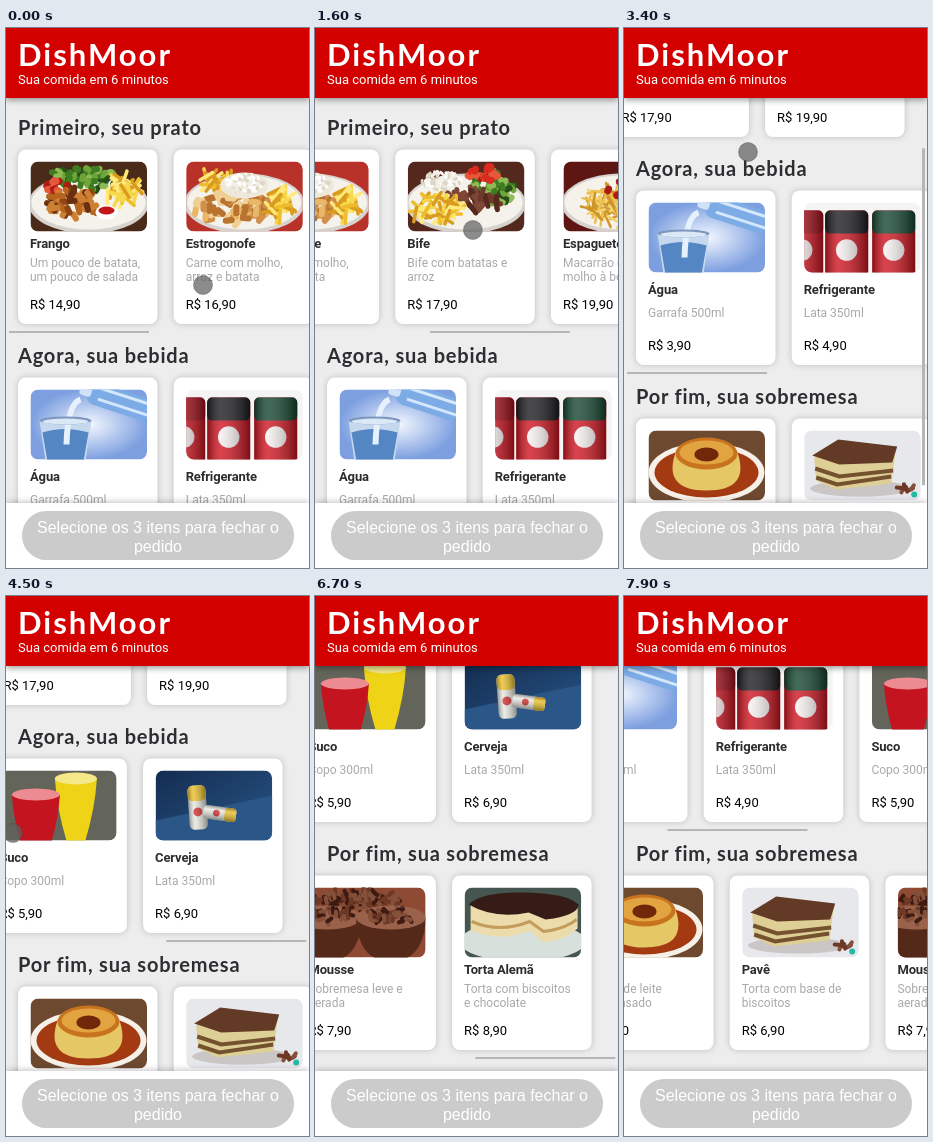
These frames come from a looping animation (303x540 px, 8 s). An HTML page:

```html
<!DOCTYPE html>
<html lang="pt">
<head>
<meta charset="utf-8">
<title>Cardápio</title>
<style>
  html, body { margin: 0; width: 100%; height: 100%; overflow: hidden; background: #ededed; }
  svg { display: block; width: 100vw; height: 100vh; }
  text { font-family: Roboto, sans-serif; font-size: 13px; }
  .brand { font: 700 31px Lato, sans-serif; letter-spacing: 2px; fill: #fff; }
  .title { font: 700 20px Lato, sans-serif; letter-spacing: .8px; fill: #302d32; }
  .name { font-weight: 700; letter-spacing: -.15px; fill: #2c2c2c; }
  .note { font-size: 12px; fill: #a9a9a9; }
  .order { font: 16px "Liberation Sans", Arial, sans-serif; fill: #fff; text-anchor: middle; }
  .card { fill: #fff; filter: drop-shadow(0 0 3px rgba(0, 0, 0, .2)); }
  .bar { fill: #b6b6b6; }
  .header { fill: #d30000; filter: drop-shadow(0 2px 3px rgba(0, 0, 0, .4)); }
  .footer { fill: #fff; filter: drop-shadow(0 -1px 3px rgba(0, 0, 0, .25)); }
</style>
</head>
<body>
<svg viewBox="0 0 303 540">
  <defs>
    <clipPath id="frame"><rect width="116.5" height="70" rx="8"/></clipPath>
    <radialGradient id="aqua"><stop stop-color="#f4f8ff"/><stop offset="1" stop-color="#7d9fe0"/></radialGradient>
    <linearGradient id="night" x2="1" y2="1"><stop stop-color="#142c50"/><stop offset="1" stop-color="#285789"/></linearGradient>
    <linearGradient id="metal"><stop stop-opacity=".35"/><stop offset=".3" stop-color="#fff" stop-opacity=".2"/><stop offset="1" stop-opacity=".4"/></linearGradient>
  </defs>
  <g id="page"></g>
  <rect class="header" width="303" height="70"/>
  <text class="brand" x="12" y="37.5">DishMoor</text>
  <text x="12" y="56" fill="#fff">Sua comida em 6 minutos</text>
  <rect class="footer" y="475" width="303" height="65"/>
  <rect x="16" y="483" width="272" height="49" rx="24.5" fill="#cbcbcb"/>
  <text class="order" x="152" y="505">Selecione os 3 itens para fechar o</text>
  <text class="order" x="152" y="524">pedido</text>
  <rect id="pageBar" class="bar" x="298" width="3" height="337"/>
  <circle id="touch" r="9.5" fill="#5f5f5f" fill-opacity=".72" stroke="#444" stroke-opacity=".35"/>
</svg>
<script>
const DURATION = 8000, STEP = 100;
const ROW_TOP = 121, ROW_PITCH = 228, CARD_PITCH = 155.7, MAX_SCROLL = 342;

// Pictures are 116.5 x 70
let seed = 7;
const random = () => (seed = seed * 16807 % 2147483647) / 2147483647;
const oval = (x, y, rx, ry, fill) => `<ellipse cx="${x}" cy="${y}" rx="${rx}" ry="${ry}" fill="${fill}"/>`;
const box = (x, y, w, h, fill, r = 0) => `<rect x="${x}" y="${y}" width="${w}" height="${h}" rx="${r}" fill="${fill}"/>`;
const shape = (d, fill) => `<path d="${d}" fill="${fill}"/>`;
const line = (d, color, width) => `<path d="${d}" fill="none" stroke="${color}" stroke-width="${width}"/>`;
const placed = (x, y, angle, art) => `<g transform="translate(${x} ${y}) rotate(${angle})">${art}</g>`;
const back = fill => box(0, 0, 117, 70, fill);

const foods = {
  fries: { w: 18, h: 3.5, colors: ['#f7d84a', '#eebd2c', '#ffe97a', '#d99c20'] },
  greens: { w: 9, h: 6, colors: ['#3f7d22', '#6ea43a', '#274f18', '#8fbb55'] },
  meat: { w: 11, h: 6, colors: ['#8d4513', '#b5651d', '#6b2f10', '#cd7f32'] },
  steak: { w: 16, h: 5, colors: ['#6e3a2a', '#7d4635', '#55291d'] },
  stew: { w: 12, h: 6, colors: ['#b8742f', '#e9b767', '#d0904a', '#f0cf94'] },
  rice: { w: 5, h: 3, colors: ['#fff', '#f3efe4', '#ddd6c6'] },
  tomato: { w: 9, h: 7, colors: ['#d92b1e', '#ad1c12', '#e8573c'] },
  pasta: { w: 20, h: 2.5, colors: ['#f5d36c', '#cf9428', '#ecc04f'] },
  cocoa: { w: 9, h: 4, colors: ['#6d3825', '#3d1a12', '#845039'] }
};

function pile(food, x, y, rx, ry) {
  const { w, h, colors } = foods[food];
  return Array.from({ length: Math.ceil(8 * rx * ry / w / h) }, () => {
    const angle = random() * 2 * Math.PI, r = Math.sqrt(random());
    const color = colors[Math.floor(random() * colors.length)];
    return placed(x + rx * r * Math.cos(angle), y + ry * r * Math.sin(angle), random() * 180,
      box(-w / 2, -h / 2, w, h, color, h / 2));
  }).join('');
}

const dish = table => back(table) + oval(58, 42, 60, 30, '#d6d3cf') + oval(58, 41, 57, 27, '#f5f2ec');
const can = (x, y, w, h, color, top, mark) => box(x, y, w, h, color, 5) + box(x, y, w, h * .35, top, 5) +
  oval(x + w / 2, y + h * .6, w / 4, w / 4, mark) + box(x, y, w, h, 'url(#metal)', 5);
const soda = (x, top) => can(x, 8, 43, 66, '#cf1420', top, '#f5efef');
const beer = scale => `<g transform="scale(${scale})">${can(-9, -22, 18, 44, '#e5e6df', '#e9bd2b', '#cf2a2a')}</g>`;
const glass = (x, y, w, color, foam) =>
  shape(`M${x - w} ${y}q2 34 ${w * .7} 72h${w * .6}q${w * .7 - 2}-38 ${w * .7}-72z`, color) + oval(x, y, w, 6, foam);
const cup = x => shape(`M${x - 35} 30q2 44 35 44t35-44z`, '#54291a') + oval(x, 30, 35, 12, '#9a624a') + pile('cocoa', x, 28, 25, 7);

const photos = {
  chicken: () => dish('#4a2a18') + pile('greens', 52, 18, 38, 11) + pile('tomato', 26, 26, 12, 7) +
    pile('fries', 92, 32, 17, 16) + pile('meat', 44, 42, 27, 14) + oval(76, 51, 11, 7, '#fff') + oval(76, 49, 8, 4, '#c31616'),
  stroganoff: () => dish('#b8322a') + pile('stew', 48, 46, 40, 16) + pile('fries', 94, 42, 12, 16) + pile('fries', 30, 18, 16, 8) +
    oval(58, 24, 24, 13, '#eee8da') + pile('rice', 58, 22, 19, 9),
  steak: () => dish('#54281c') + pile('rice', 34, 20, 20, 10) + pile('greens', 88, 26, 22, 17) + pile('tomato', 76, 13, 15, 8) +
    pile('steak', 66, 38, 26, 10) + pile('fries', 28, 47, 24, 13),
  spaghetti: () => dish('#5e1612') + pile('pasta', 60, 42, 36, 18) + pile('tomato', 64, 27, 22, 8),
  water: () => back('url(#aqua)') +
    placed(88, 11, 18, box(-32, -11, 66, 23, '#7dabe6', 9) + box(-40, -6, 12, 12, '#cfe2f7', 3) + line('M-20-6H34M-20 5H34', '#d5e7fb', 3)) +
    shape('M9 31H61L55 72H15z', '#c6d8ee') + shape('M12 43q22-7 46 0L53 72H17z', '#5486c4') +
    line('M50 10Q37 14 36 55', '#e6f1fd', 6) + oval(35, 31, 26, 4, '#7d97bd') + oval(35, 32, 23, 3, '#dbe8f6'),
  soda: () => back('#f4f4f4') + soda(-24, '#a7101c') + soda(21, '#1c1c20') + soda(68, '#14452f'),
  juice: () => back('#64655a') + glass(76, 8, 21, '#eed316', '#f5e889') + glass(36, 24, 24, '#c41420', '#ec8b91'),
  beer: () => back('url(#night)') + shape('M0 50L117 25V70H0z', '#2a5688') + placed(42, 37, -4, beer(1)) + placed(64, 43, 98, beer(.75)),
  flan: () => back('#6d4930') + oval(58, 42, 58, 30, '#f5f0e8') + oval(58, 42, 52, 25, '#a33a12') +
    shape('M27 22Q14 60 58 60T89 22z', '#e5c766') + oval(58, 23, 31, 16, '#c8741f') + oval(58, 22, 27, 12, '#e2a440') + oval(58, 24, 12, 7, '#71270a'),
  trifle: () => back('#e7e8eb') + oval(56, 58, 50, 8, '#c9c6c5') + shape('M10 27L35 10 92 17 87 53 31 59 12 50z', '#ddcf95') +
    line('M11 38l24 8 54-6M12 47l21 7 54-8', '#74512f', 4) + shape('M8 25L34 9 93 16 88 32 35 34z', '#633a25') +
    pile('cocoa', 100, 58, 9, 3) + oval(110, 64, 3, 3, '#25b9a4'),
  mousse: () => back('#8f4a34') + pile('cocoa', 48, 12, 45, 10) + cup(18) + cup(82),
  tart: () => back('#45554f') + oval(58, 54, 63, 20, '#d8e0dc') + shape('M6 17V43Q35 55 65 43L79 55Q101 52 113 41V17z', '#ecdbab') +
    line('M7 34q28 12 58 0l14 10q20-2 33-12', '#c49d5c', 3) + shape('M4 17Q17 4 60 5T114 17Q114 28 81 32L64 25Q30 32 4 17z', '#351c17')
};

const menu = [
  { title: 'Primeiro, seu prato', items: [
    ['chicken', 'Frango', '14,90', 'Um pouco de batata,', 'um pouco de salada'],
    ['stroganoff', 'Estrogonofe', '16,90', 'Carne com molho,', 'arroz e batata'],
    ['steak', 'Bife', '17,90', 'Bife com batatas e', 'arroz'],
    ['spaghetti', 'Espaguete', '19,90', 'Macarrão com', 'molho à bolonhesa']] },
  { title: 'Agora, sua bebida', items: [
    ['water', 'Água', '3,90', 'Garrafa 500ml'],
    ['soda', 'Refrigerante', '4,90', 'Lata 350ml'],
    ['juice', 'Suco', '5,90', 'Copo 300ml'],
    ['beer', 'Cerveja', '6,90', 'Lata 350ml']] },
  { title: 'Por fim, sua sobremesa', items: [
    ['flan', 'Pudim', '5,90', 'Pudim de leite', 'condensado'],
    ['trifle', 'Pavê', '6,90', 'Torta com base de', 'biscoitos'],
    ['mousse', 'Mousse', '7,90', 'Sobremesa leve e', 'aerada'],
    ['tart', 'Torta Alemã', '8,90', 'Torta com biscoitos', 'e chocolate']] }
];

const label = (kind, y, words) => `<text class="${kind}" x="12" y="${y}">${words}</text>`;

function card([photo, name, price, ...notes], index) {
  const spare = notes.length > 1 ? 0 : 4.5;
  return placed(12 + index * CARD_PITCH, 0, 0, `
    <rect class="card" y=".5" width="139.5" height="174.5" rx="8"/>
    ${placed(12.5, 12.5, 0, `<g clip-path="url(#frame)">${photos[photo]()}</g>`)}
    ${label('name', 99 + spare, name)}
    ${notes.map((note, i) => label('note', 118 + 2 * spare + i * 14, note)).join('')}
    ${label('price', 160, 'R$ ' + price)}`);
}

const byId = id => document.getElementById(id);
byId('page').innerHTML = menu.map(({ title, items }, i) => placed(0, ROW_TOP + i * ROW_PITCH, 0, `
  ${label('title', -14, title)}
  <g id="row${i}">${items.map(card).join('')}</g>
  <rect id="row${i}Bar" class="bar" y="182" width="140" height="2"/>`)).join('');

// Each swipe drags one target by a distance; the finger glides from one to the next
const swipes = [
  { target: 'row0', start: 400, end: 900, x: 207, y: 243, by: 172 },
  { target: 'row0', start: 1450, end: 1800, x: 229, y: 202, by: 166 },
  { target: 'page', start: 2900, end: 3400, x: 124, y: 311, by: 187 },
  { target: 'row1', start: 3500, end: 3800, x: 200, y: 237, by: 150 },
  { target: 'row1', start: 4200, end: 4500, x: 199, y: 237, by: 192 },
  { target: 'page', start: 4800, end: 5200, x: 149, y: 240, by: 111 },
  { target: 'row2', start: 5800, end: 6100, x: 210, y: 365, by: 160 },
  { target: 'row2', start: 6300, end: 6600, x: 210, y: 365, by: 230 },
  { target: 'row2', start: 6800, end: 7200, x: -20, y: 365, by: -280 },
  { target: 'row1', start: 7300, end: 7900, x: 65, y: 110, by: -254 }
];
const GLIDE = 300, BAR_HOLD = 400, BAR_FADE = 300;
const clamp = (value, max = 1) => Math.min(max, Math.max(0, value));

function stateAt(time) {
  const scroll = { row0: 0, row1: 0, row2: 0, page: 0 };
  const shown = { row0: 1, row1: 1, row2: 1, page: 0 };
  let x = 197, y = 257, freeSince = 0;
  for (const { target, start, end, by, ...from } of swipes) {
    const arrived = clamp(1 - (start - time) / Math.min(GLIDE, start - freeSince));
    x += (from.x - x) * arrived;
    y += (from.y - y) * arrived;
    if (time < start) break;
    const dragged = by * clamp((time - start) / (end - start));
    if (target === 'page') y -= dragged; else x -= dragged;
    scroll[target] = clamp(scroll[target] + dragged, MAX_SCROLL);
    shown[target] = clamp((end + BAR_HOLD + BAR_FADE - time) / BAR_FADE);
    freeSince = end;
  }
  return { scroll, shown, x, y };
}

const move = (id, x, y) => byId(id).setAttribute('transform', `translate(${x} ${y})`);

function draw(now) {
  const { scroll, shown, x, y } = stateAt(Math.floor(now % DURATION / STEP) * STEP);
  for (const target in scroll) {
    const offset = scroll[target], vertical = target === 'page';
    if (vertical) {
      move(target, 0, -offset);
      move(target + 'Bar', 0, 3 + offset * .627);
    } else {
      move(target, -offset, 0);
      move(target + 'Bar', 3 + offset * .46, 0);
    }
    byId(target + 'Bar').setAttribute('opacity', shown[target]);
  }
  move('touch', x, y);
  requestAnimationFrame(draw);
}
requestAnimationFrame(draw);
</script>
</body>
</html>
```
